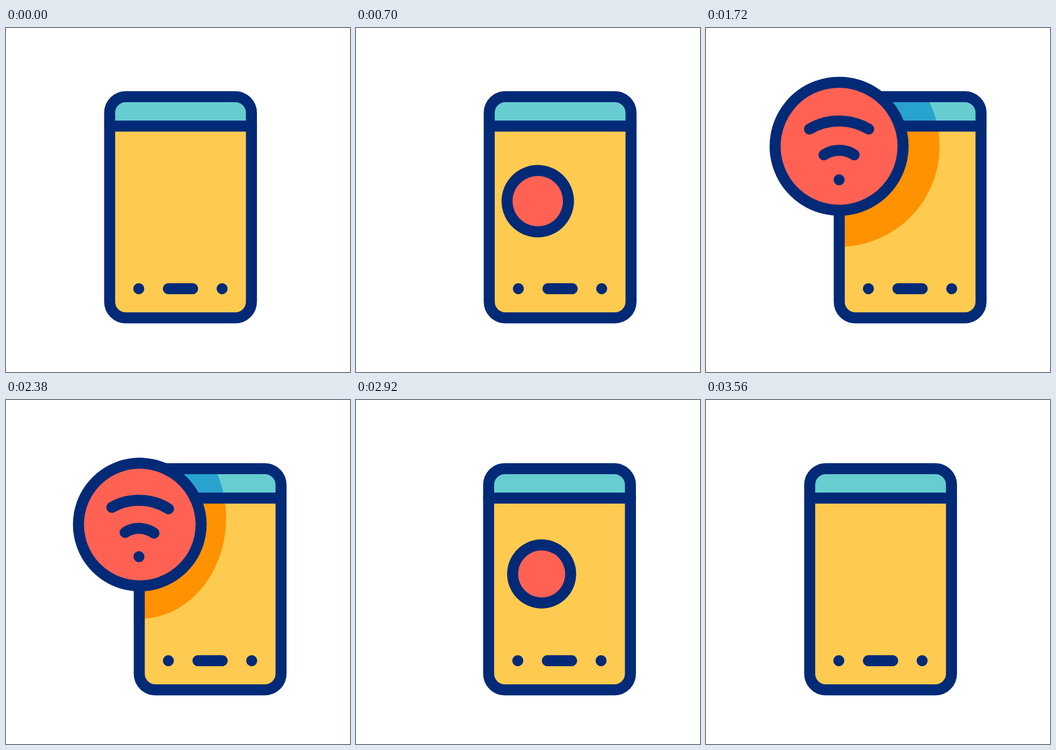
Recreate the animation shown at these times as an HTML page. Size 640 by 640 pixels, loop 3.6 s.

```html
<!DOCTYPE html>
<html lang="en">
<head>
<meta charset="utf-8">
<title>Phone signal</title>
<style>
html, body { margin: 0; height: 100%; overflow: hidden; background: #fff; }
svg { display: block; width: 100vw; height: 100vh; }
.line { stroke: #032a77; stroke-width: 20.5; stroke-linecap: round; fill: none; }
</style>
</head>
<body>
<svg viewBox="0 0 640 640">
  <defs>
    <path id="top" d="M192.8 182.5V157.8a30 30 0 0 1 30-30h203.8a30 30 0 0 1 30 30V182.5z"/>
    <path id="body" d="M192.8 182.5H456.6V509.2a30 30 0 0 1-30 30H222.8a30 30 0 0 1-30-30z"/>
    <clipPath id="inTop"><use href="#top"/></clipPath>
    <clipPath id="inBody"><use href="#body"/></clipPath>
    <path id="route" d="M369 325.5C302 326 250.5 278 247.6 220"/>
  </defs>
  <g id="phone">
    <use href="#top" fill="#67cdd1"/>
    <use href="#body" fill="#fecb50"/>
    <g clip-path="url(#inTop)"><circle class="shade" cx="192.5" cy="220" r="187" fill="#28a2ce"/></g>
    <g clip-path="url(#inBody)"><circle class="shade" cx="192.5" cy="220" r="187" fill="#ff9200"/></g>
    <rect class="line" x="192.8" y="127.8" width="263.8" height="411.4" rx="30"/>
    <path class="line" d="M192.8 182.5H456.6M247 485h.01M302 485H347.2M402 485h.01"/>
  </g>
  <g id="badge">
    <path id="ring" class="line" style="fill:#ff6253"/>
    <g id="wifi">
      <path class="line" pathLength="1"/>
      <path class="line" pathLength="1"/>
      <circle fill="#032a77"/>
    </g>
  </g>
</svg>
<script>
const LOOP = 3600, TURN = 1790;
const $ = id => document.getElementById(id);
const clamp = x => Math.min(1, Math.max(0, x));
const smooth = x => (x = clamp(x), x * x * (3 - 2 * x));

// Cubic-bezier easing (a, 0, 1 - a, 1)
function sharp(x, a = 0.87) {
  x = clamp(x);
  let lo = 0, hi = 1;
  for (let i = 0; i < 24; i++) {
    const s = (lo + hi) / 2, r = 1 - s;
    if (3 * a * s * r * r + 3 * (1 - a) * s * s * r + s ** 3 < x) lo = s; else hi = s;
  }
  return smooth(lo);
}

// Rises between the first two times, falls between the last two
const pulse = (t, upA, upB, downA, downB, ease = smooth) =>
  t < TURN ? ease((t - upA) / (upB - upA)) : ease((downB - t) / (downB - downA));

function arcPath(r, from, span) {
  const point = deg => {
    const a = deg * Math.PI / 180;
    return `${r * Math.cos(a)} ${r * Math.sin(a)}`;
  };
  return `M${point(from)}A${r} ${r} 0 ${span > 180 ? 1 : 0} 1 ${point(from + span)}`;
}

const shades = document.querySelectorAll('.shade');
const [bigWave, smallWave, dot] = $('wifi').children;
const routeLength = $('route').getTotalLength();

function drawWave(el, k, x, y, r, amount) {
  el.setAttribute('d', `M${-x * k} ${y * k}A${r * k} ${r * k} 0 0 1 ${x * k} ${y * k}`);
  el.setAttribute('stroke-dasharray', `${amount} 2`);
  el.style.display = amount > 0.01 ? '' : 'none';
}

function draw(t) {
  const slide = pulse(t, -10, 710, 2860, 3580);
  $('phone').setAttribute('transform', `translate(${55.1 * slide})`);

  const width = pulse(t, 700, 1170, 2226, 2880);
  for (const s of shades)
    s.setAttribute('transform', `translate(203) scale(${width} 1) translate(-203)`);

  const grow = pulse(t, -10, 1710, 1860, 3580, sharp);
  const radius = 44 + 75 * grow;
  const at = $('route').getPointAtLength(routeLength * grow);
  $('badge').setAttribute('transform', `translate(${at.x} ${at.y})`);
  $('badge').style.display = slide > 0.004 ? '' : 'none';
  $('ring').setAttribute('d',
    arcPath(radius, 65 * (1 - slide) - 50, Math.min(359.9, 360 * slide)));

  const k = radius / 119;
  $('wifi').setAttribute('transform', `rotate(${22 * (1 - grow)})`);
  drawWave(bigWave, k, 55, -32, 108.5, pulse(t, 1120, 1330, 2385, 2540));
  drawWave(smallWave, k, 28, 16, 50.4, pulse(t, 1080, 1250, 2420, 2570));
  dot.setAttribute('cy', 62.5 * k);
  dot.setAttribute('r', 10.25 * pulse(t, 1045, 1150, 2450, 2600));
}

function tick() {
  draw(performance.now() % LOOP);
  requestAnimationFrame(tick);
}
tick();
</script>
</body>
</html>
```
